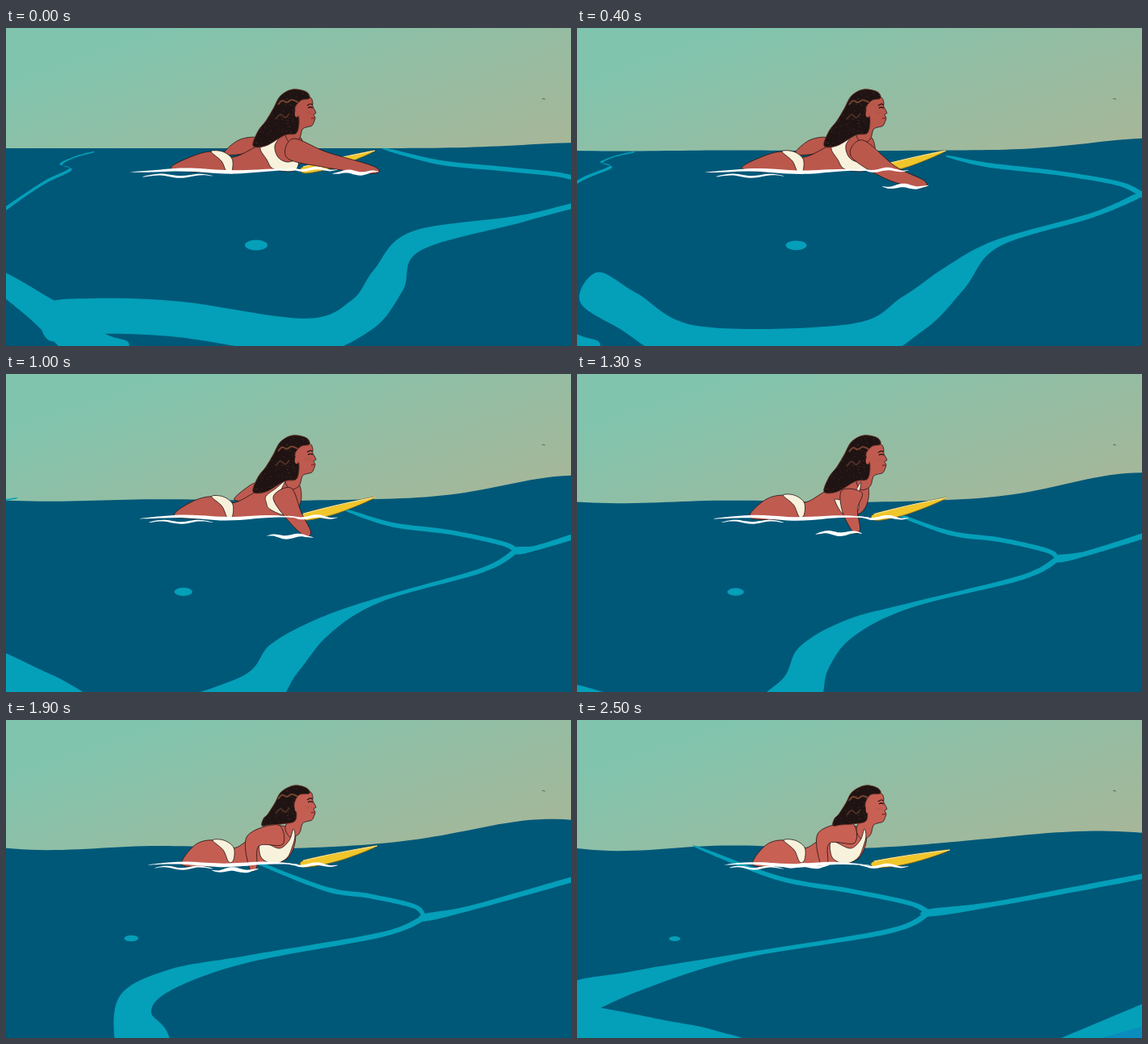
An HTML page with a canvas for the animation above (2.6 s loop, 700 by 394 pixels).

```html
<!DOCTYPE html>
<html lang="en">
<head>
<meta charset="utf-8">
<title>Paddling out</title>
<style>
html, body { margin: 0; height: 100%; overflow: hidden; }
canvas { display: block; width: 100vw; height: 100vh; }
</style>
</head>
<body>
<canvas id="stage" width="700" height="394"></canvas>
<script>
const ctx = document.getElementById('stage').getContext('2d');
const LOOP = 2600, STEP = 100, END = 2500;
const TEAL = '#049fb9', CREAM = '#f8f2dc', INK = '#241416';
const KNOTS = [0, 0.4, 0.76, 1];
let t, u, turn, skin;   // time, progress, arm-back progress, skin colour

const lerp = (a, b, k) => a + (b - a) * k;
const mix = (a, b, k) => a.map((v, i) => lerp(v, b[i], k));
const clamp = v => Math.min(1, Math.max(0, v));
const smooth = v => (v = clamp(v)) * v * (3 - 2 * v);
const pairs = flat => flat.flatMap((v, i) => i % 2 ? [] : [[v, flat[i + 1]]]);

// Cubic motion through four poses, one at each knot.
function drift(...keys) {
  const weight = KNOTS.map((a, i) => KNOTS.reduce((w, b, j) => i === j ? w : w * (u - b) / (a - b), 1));
  return keys[0].map((_, i) => keys.reduce((sum, key, j) => sum + key[i] * weight[j], 0));
}

// Smooth curve through every point.
function curve(pts, closed) {
  const path = new Path2D(), n = pts.length;
  const at = i => closed ? pts[(i + n) % n] : pts[Math.min(n - 1, Math.max(0, i))];
  path.moveTo(...pts[0]);
  for (let i = 0; i < (closed ? n : n - 1); i++) {
    const [a, b, c, d] = [at(i - 1), at(i), at(i + 1), at(i + 2)];
    path.bezierCurveTo(b[0] + (c[0] - a[0]) / 6, b[1] + (c[1] - a[1]) / 6,
      c[0] - (d[0] - b[0]) / 6, c[1] - (d[1] - b[1]) / 6, ...c);
  }
  return path;
}

function paint(path, fill, outline) {
  ctx.fillStyle = fill;
  ctx.fill(path);
  if (outline) {
    ctx.strokeStyle = outline;
    ctx.lineWidth = 0.8;
    ctx.stroke(path);
  }
  return path;
}

const shape = (flat, fill, outline) => paint(curve(pairs(flat), true), fill, outline);

function ribbon(flat, width, fill, outline) {
  const pts = pairs(flat), one = [], two = [];
  pts.forEach(([x, y], i) => {
    const a = pts[Math.max(0, i - 1)], b = pts[Math.min(pts.length - 1, i + 1)];
    const dx = b[0] - a[0], dy = b[1] - a[1];
    const k = width(i, y) / 2 / (Math.hypot(dx, dy) || 1);
    one.push([x - dy * k, y + dx * k]);
    two.unshift([x + dy * k, y - dx * k]);
  });
  paint(curve(one.concat(two), true), fill, outline);
}

function line(flat, color, width) {
  ctx.strokeStyle = color;
  ctx.lineWidth = width;
  ctx.stroke(curve(pairs(flat), false));
}

function oval(x, y, rx, ry, fill) {
  ctx.fillStyle = fill;
  ctx.beginPath();
  ctx.ellipse(x, y, rx, ry, 0, 0, 7);
  ctx.fill();
}

const sky = ctx.createLinearGradient(300, -40, 396, 248);
sky.addColorStop(0, '#80c4ae');
sky.addColorStop(1, '#a8b698');

// A crest rolls in from the right while the rest of the sea sinks a little.
function horizon(x) {
  const height = 7 + 14 * u + 22 * Math.sin(Math.PI * u ** 1.3);
  const offset = (x - 720 + 80 * u * u) / (110 + 45 * u);
  const ripple = 5 * u * Math.exp(-x / 300) * Math.sin((x + 10) * Math.PI / 140);
  return 149 + 9 * clamp(2 * u) + ripple - height * Math.exp(-offset * offset);
}

function drawSea() {
  ctx.fillStyle = sky;
  ctx.fillRect(0, 0, 700, 394);
  line([664,88, 666,87.5, 668,88.5], '#4d6a66', 1);

  const sea = new Path2D('M0 394');
  for (let x = 0; x <= 700; x += 10) sea.lineTo(x, horizon(x));
  sea.lineTo(700, 394);
  paint(sea, '#005878');
}

function drawStreams() {
  const node = drift([740,210], [632,219], [518,245], [436,239]);
  const upper = drift(
    [474,151, 540,167, 620,175, 700,185],
    [425,170, 480,187, 550,196, 615,210],
    [300,172, 395,209, 450,218, 506,231],
    [155,160, 250,196, 340,212, 412,227]);
  const lower = drift(
    [640,236, 508,264, 474,312, 440,356, 370,382, 215,361, 110,357, 50,365],
    [590,243, 465,279, 395,312, 345,352, 300,402, 150,440, 45,398, -40,365],
    [465,266, 300,296, 205,321, 160,352, 170,402, 190,460, 100,470, 0,480],
    [385,262, 200,293, 75,323, -12,352, -5,382, 100,408, 160,420, 200,440]);
  const end = [720, 200 - 10 * u];
  const bend = [lerp(node[0], end[0], 0.3), lerp(node[1], end[1], 0.3) + 3];

  // The lower arm widens towards the viewer.
  const near = 292 - 60 * (1 - u) ** 4;
  const spread = (i, y) => Math.min(6 + 0.62 * Math.max(0, y - near), 44 + 30 * u);
  ribbon([...upper, ...node], i => i ? 5.5 : 3, TEAL);
  ribbon([...node, ...bend, ...end], i => i ? 6 : 9, TEAL);
  ribbon([...node, ...lower], spread, TEAL);

  const fork = [-15,308, 45,350, 105,398, 130,420];
  ribbon(fork.map((v, i) => i % 2 ? v : v - t * 0.31), i => 20 + 16 * i, TEAL);
  const creek = [107,153, 85,159, 68,168, 80,174, 50,189, 22,207, -5,226];
  ribbon(creek.map((v, i) => i % 2 ? 154 + (v - 153) * (1 - t / 2700) : v - t * 0.095), i => i < 2 ? 1.5 : 3.5, TEAL);

  oval(310 - 250 * u + 61 * u * u, 269 + 2 * u, 14 - 7 * u, 6.5 - 3.5 * u, TEAL);

  const x = 595 + (END - t) * 0.2;
  paint(new Path2D(`M${x} 396l300 -126v126z`), TEAL);
  paint(new Path2D(`M${x + 55} 394l300 -84v84z`), '#0a8cbd');
}

function drawHead(drop) {
  ctx.save();
  ctx.translate(0, drop);
  shape([366,86, 377,86, 380,92, 380,97, 384,105, 381,107, 383,111, 382,115, 379,121, 372,123, 367,126, 363,138, 352,142, 346,130, 354,114, 356,98], skin, INK);
  line([373,96, 377,94, 380,95], INK, 1.2);
  line([374,99, 377,98, 380,99], INK, 1.3);
  line([378,112, 381,111.5, 383,112], '#8c2f33', 1.6);
  for (let i = 0; i < 5; i++) oval(371 + i * 1.7, 104 + i * 2 % 3, 0.45, 0.45, '#8a3a34');
  ctx.restore();
}

function drawHair(drop) {
  const hair = mix(
    [376,87, 372,79, 355,76, 340,84, 331,100, 322,115, 312,128, 306,146, 322,146, 345,133, 360,130, 363,112, 358,100, 365,90],
    [376,91, 372,84, 357,81, 341,89, 333,103, 324,117, 319,122, 317,131, 327,130, 341,129, 357,126, 360,116, 357,105, 363,93],
    smooth((t - 1400) / 500));
  const path = shape(hair, '#1f1413', '#6b3328');
  ctx.save();
  ctx.clip(path);
  let seed = 7;
  const rnd = () => (seed = seed * 16807 % 2147483647) / 2147483647;
  for (let i = 0; i < 150; i++) oval(300 + rnd() * 75, 78 + rnd() * 70, 0.5, 0.5, '#593429');
  ctx.translate(0, drop);
  line([337,95, 342,90, 348,92, 354,89, 362,92], '#75432f', 2);
  line([334,113, 340,107, 346,111, 351,106], '#593429', 1.5);
  ctx.restore();
  oval(360, 106 + drop, 2.2, 4.5, skin);
}

function drawBoard() {
  const tip = [457 + 5 * u * u, 152 + 9 * u ** 3], tail = [368, 172 + 3 * u];
  const [mx, my] = mix(tail, tip, 0.5);
  shape([...tip, mx, my - 1, ...tail, tail[0] + 4, tail[1] + 8, mx, my + 9], '#f0c62b', '#715b1b');
  line([...tip, mx, my - 1, ...tail], '#faf0b4', 1);
}

// Thin white streak that swells in the middle.
function foam(x1, x2, y, width) {
  const pts = [], n = 8;
  for (let i = 0; i <= n; i++) pts.push(lerp(x1, x2, i / n), y + 1.5 * Math.sin(i * 1.3 + x1 / 20));
  ribbon(pts, i => 0.6 + width * Math.sin(Math.PI * i / n), '#fff');
}

function drawSurfer() {
  const drop = 5 * u * u;
  const elbow = lerp(270, 312, turn);
  shape([310,136, elbow + 18,139, elbow,155, elbow + 16,157, 308,151], skin, INK);
  drawBoard();

  const body = mix(
    [205,174, 228,160, 255,153, 281,160, 312,146, 340,133, 366,137, 362,170, 300,177, 250,179],
    [218,179, 234,155, 257,149, 281,159, 304,146, 331,131, 358,139, 347,173, 300,179, 250,181], turn);
  shape(body, skin, INK);
  const brief = [-1,0, 13,0, 25,9, 25,24, 19,27, 12,12];
  shape(brief.map((v, i) => v + body[4 + i % 2]), CREAM, INK);
  drawHead(drop);

  shape(mix(
    [341,132, 328,138, 315,148, 323,163, 332,175, 357,177, 362,164, 348,166, 337,160, 333,146],
    [356,135, 351,149, 339,159, 322,152, 314,149, 316,170, 332,178, 348,171, 355,156, 358,144], turn), CREAM, INK);

  const arm = drift(
    [352,149, 395,163, 455,176],
    [342,147, 358,177, 374,198],
    [340,142, 306,150, 306,183],
    [342,140, 306,146, 306,178]);
  ribbon(arm, i => [25, 19, 9][i], skin, INK);
  drawHair(drop);

  const [handX, handY] = arm.slice(4);
  foam(157 + 28 * u, 362, 177 + 2 * u, 4);
  foam(170 + 20 * u, 255, 183, 2);
  foam(handX - 50, handX + 6, handY + 3, 4);
  foam(350, 410, 175 + 6 * u, 3);
}

function frame() {
  t = Math.floor(performance.now() % LOOP / STEP) * STEP;
  u = t / END;
  turn = smooth((t - 600) / 1100);
  skin = `rgb(${184 + 16 * u}, ${86 + 10 * u}, ${75 + 9 * u})`;
  drawSea();
  drawStreams();
  drawSurfer();
  requestAnimationFrame(frame);
}
frame();
</script>
</body>
</html>
```
